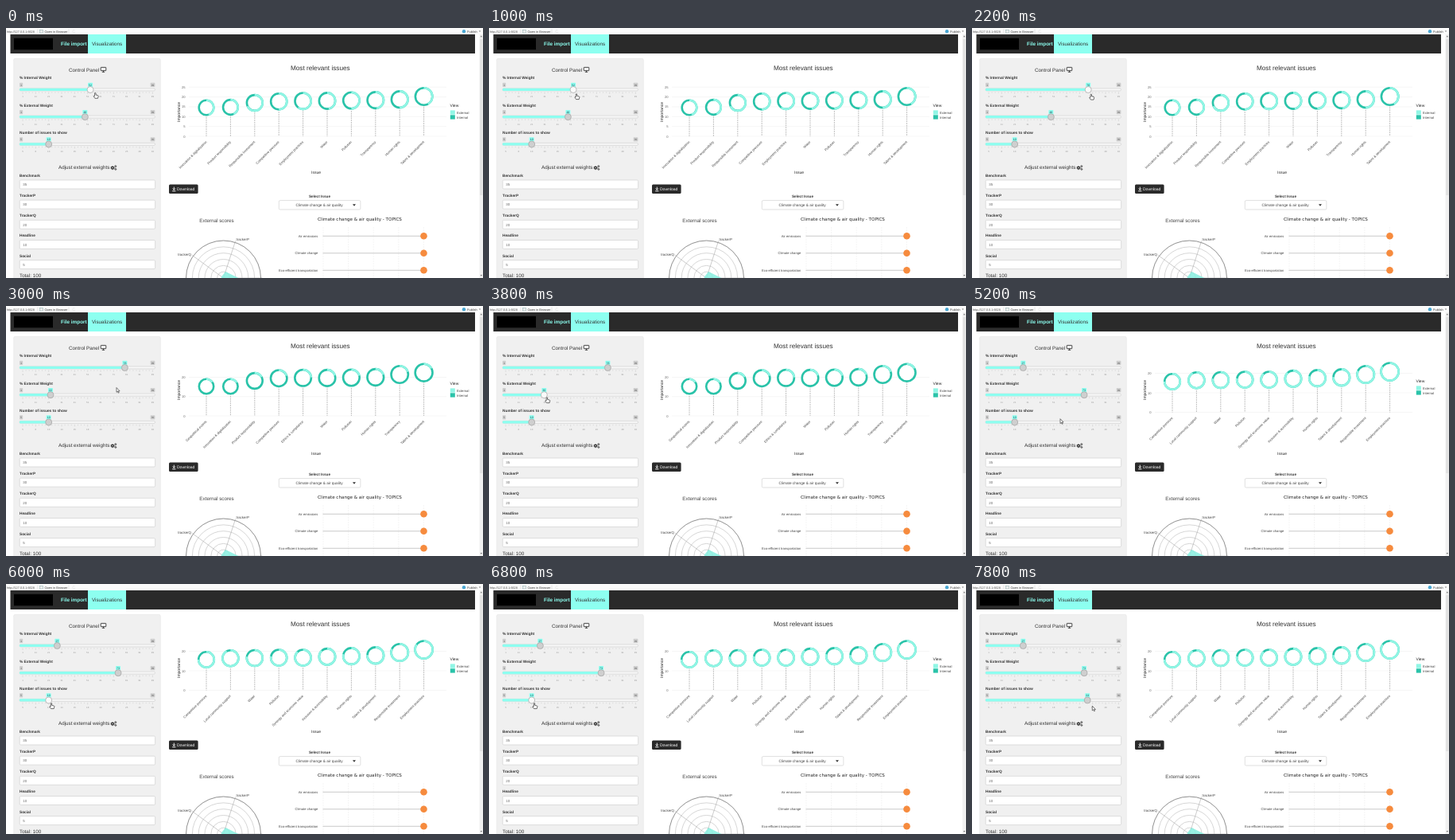
Animation of 600x314 px, one loop 8 s. Source, as an HTML page:

```html
<!DOCTYPE html>
<html lang="en">
<head>
<meta charset="utf-8">
<title>Most relevant issues</title>
<style>
html, body { margin: 0; width: 100%; height: 100%; overflow: hidden; background: #fff; }
svg { display: block; width: 100vw; height: 100vh; }
text { font-family: "Liberation Sans", Arial, sans-serif; text-rendering: geometricPrecision; white-space: pre; }
</style>
</head>
<body>
<svg id="stage" viewBox="0 0 600 314"></svg>
<script>
const MINT = '#8dfff0', GREEN = '#2ac3a9', RING_MINT = '#90f6e5', DARK = '#2a2a2a';
const LOOP = 8000, STEP = 200;
const stage = document.getElementById('stage');

function el(parent, tag, attrs, content) {
  const node = document.createElementNS('http://www.w3.org/2000/svg', tag);
  set(node, attrs);
  if (content !== undefined) node.textContent = content;
  parent.append(node);
  return node;
}
function set(node, attrs) {
  for (const key in attrs) node.setAttribute(key, attrs[key]);
}
const group = (parent = stage, attrs = {}) => el(parent, 'g', attrs);
const rect = (g, x, y, width, height, fill, more = {}) =>
  el(g, 'rect', { x, y, width, height, fill, ...more });
const circle = (g, cx, cy, r, fill, more = {}) => el(g, 'circle', { cx, cy, r, fill, ...more });
const path = (g, d, stroke, width = 0.5, more = {}) =>
  el(g, 'path', { d, stroke, 'stroke-width': width, fill: 'none', ...more });
const shape = (g, d, fill, more = {}) => el(g, 'path', { d, fill, ...more });
const text = (g, x, y, size, content, fill = '#333', more = {}) =>
  el(g, 'text', { x, y, 'font-size': size, fill, ...more }, content);
const MID = { 'text-anchor': 'middle' }, END = { 'text-anchor': 'end' }, BOLD = { 'font-weight': 'bold' };

function drawFrame() {
  const g = group();
  rect(g, 0, 0, 600, 8, '#fbfbfb');
  text(g, 1, 5.8, 3.8, 'http://127.0.0.1:6628', '#555');
  path(g, 'M40 1.5V6.5M79 1.5V6.5', '#ccc');
  rect(g, 42.5, 2.5, 4, 3.6, '#eee', { stroke: '#8aa', 'stroke-width': 0.5 });
  text(g, 48.6, 5.8, 3.9, 'Open in Browser', '#444');
  path(g, 'M86.5 3A1.7 1.7 0 1 0 87 5', '#ddd', 0.6);
  circle(g, 576, 4.2, 2.2, '#49a6d2');
  text(g, 580, 5.8, 3.9, 'Publish', '#444');
  shape(g, 'M594.8 3.5h2.4l-1.2 1.6z', '#777');
  rect(g, 5.5, 8, 584.5, 24, DARK);
  rect(g, 10, 12.8, 49, 14.4, '#000');
  rect(g, 103, 8, 48, 24, MINT);
  text(g, 69, 22.2, 6.4, 'File import', MINT, BOLD);
  text(g, 108, 22.2, 6.25, 'Visualizations', '#333');
  rect(g, 595.5, 8, 4.5, 306, '#f1f1f1');
  rect(g, 596, 14, 3.5, 196, '#e2e2e2');
  shape(g, 'M596.5 11.2h2.6l-1.3-1.8zM596.5 310h2.6l-1.3 1.8z', '#777');
}

function gear(g, cx, cy, r) {
  circle(g, cx, cy, r * 0.65, 'none', { stroke: '#222', 'stroke-width': r * 0.55 });
  circle(g, cx, cy, r, 'none', {
    stroke: '#222', 'stroke-width': r * 0.4, 'stroke-dasharray': `${r * 0.42} ${r * 0.365}`
  });
}

function drawPanel() {
  const g = group();
  rect(g, 9.7, 38.3, 184.6, 290, '#f0f0f0', { rx: 2, stroke: '#e0e0e0', 'stroke-width': 0.5 });
  text(g, 79, 54.6, 6.3, 'Control Panel');
  rect(g, 119.2, 49.4, 6.6, 4.2, 'none', { rx: 0.5, stroke: '#222', 'stroke-width': 0.8 });
  path(g, 'M122.5 53.7V55.2M120.8 55.3H124.2', '#222', 0.8);
  text(g, 66, 177.4, 6.25, 'Adjust external weights');
  gear(g, 134, 175.6, 2.1);
  gear(g, 137.8, 173.7, 1.2);
  gear(g, 137.8, 177.4, 1.2);
  const inputs = [['Benchmark', 35], ['TrackerP', 30], ['TrackerQ', 20], ['Headline', 10], ['Social', 5]];
  inputs.forEach(([name, value], i) => {
    const y = 191 + i * 25.15;
    text(g, 17, y - 4, 4.75, name, '#333', BOLD);
    rect(g, 17.2, y, 170.4, 11, '#fff', { rx: 1.4, stroke: '#ccc', 'stroke-width': 0.6 });
    text(g, 21.3, y + 7.2, 4.4, value, '#666');
  });
  text(g, 17, 313.2, 6.25, 'Total: 100');
}

function makeSlider(label, y, min, max, unit) {
  const g = group();
  const xOf = v => 21 + (v - min) / (max - min) * 163.4;
  text(g, 17, y - 13, 4.8, label, '#333', BOLD);
  const badge = (x, w, fill, value) => {
    rect(g, x, y - 8.5, w, 5.2, fill, { rx: 0.8 });
    return text(g, x + w / 2, y - 4.7, 3.2, value, '#555', MID);
  };
  badge(17, 4.2, '#cfcfcf', min);
  badge(181.6, 5.8, '#cfcfcf', max);
  rect(g, 17, y - 1.4, 170.5, 3, '#f7f7f7', { rx: 1.4, stroke: '#c4c4c4', 'stroke-width': 0.5 });
  const fill = rect(g, 17, y - 1.5, 1, 3.2, MINT, { rx: 1.2 });
  for (let i = 0; i <= 40; i++) {
    const x = 21 + i * 4.085, major = i % 4 === 0;
    path(g, `M${x} ${y + 3}v${major ? 2.6 : 1.4}`, '#bbb', 0.4);
    if (major) text(g, x, y + 10, 2.9, Math.min(max, Math.round(min + i / 4 * unit)), '#999', MID);
  }
  const tag = group(g);
  rect(tag, -3, y - 8.5, 6, 5.2, MINT, { rx: 0.8 });
  const number = text(tag, 0, y - 4.6, 3.5, '', '#245', MID);
  const knob = circle(g, 0, y + 0.2, 4, '#cfcfcf', { stroke: '#a3a3a3', 'stroke-width': 0.7 });
  return (value, active) => {
    const x = xOf(value);
    set(fill, { width: x - 17 });
    set(tag, { transform: `translate(${x})` });
    set(knob, { cx: x, fill: active ? '#fafafa' : '#cfcfcf' });
    number.textContent = Math.round(value);
  };
}

// Each ring: name, centre height, external share.
const charts = [
  { zero: 136, unit: 12.35 / 5, ticks: [0, 5, 10, 15, 20, 25], legend: 0, axis: 183, rings: [
    ['Innovation & digitalization', 100, .45], ['Product responsibility', 99.5, .43],
    ['Responsible Investment', 94, .68], ['Competitive pressure', 92.3, .5],
    ['Employment practices', 91.7, .6], ['Water', 91.5, .47], ['Pollution', 91, .5],
    ['Transparency', 90.6, .48], ['Human rights', 89.7, .5], ['Talent & development', 86, .42]] },
  { zero: 138, unit: 2.42, ticks: [0, 10, 20], legend: 0, axis: 186.7, rings: [
    ['Geopolitical events', 101, .15], ['Innovation & digitalization', 101, .16],
    ['Product responsibility', 94, .17], ['Competitive pressure', 90.7, .2],
    ['Ethics & compliance', 90.3, .24], ['Water', 90.4, .2], ['Pollution', 90, .21],
    ['Human rights', 89.5, .2], ['Transparency', 86, .2], ['Talent & development', 83.7, .17]] },
  { zero: 133.5, unit: 2.45, ticks: [0, 10, 20], legend: -3, axis: 186.7, rings: [
    ['Competitive pressure', 95, .75], ['Local community support', 93.2, .92],
    ['Water', 93, .78], ['Pollution', 92.6, .78], ['Synergy and economic value', 92.6, .88],
    ['Inclusion & accessibility', 91.3, .88], ['Human rights', 90.6, .79],
    ['Talent & development', 89.7, .76], ['Responsible Investment', 86, .82],
    ['Employment practices', 82.5, .85]] }
].map(drawChart);

function drawChart({ zero, unit, ticks, legend, axis, rings }) {
  const g = group();
  for (const value of ticks) {
    const y = zero - value * unit;
    path(g, `M230 ${y}H554`, '#ececec', 0.5);
    text(g, 225.5, y + 1.5, 4.1, value, '#666', END);
  }
  rings.forEach(([name, y, external], i) => {
    const x = 252 + i * 30.4, r = 9.2 + (101 - y) * 0.1;
    path(g, `M${x} ${y + r}V${zero}`, '#777', 0.5, { 'stroke-dasharray': '1.8 1' });
    circle(g, x, y, r + 1.2, '#fff');
    circle(g, x, y, r, 'none', { stroke: GREEN, 'stroke-width': 2.6 });
    circle(g, x, y, r, 'none', {
      stroke: RING_MINT, 'stroke-width': 2.6, pathLength: 1,
      'stroke-dasharray': `${external} 1`, transform: `rotate(-90 ${x} ${y})`
    });
    text(g, 0, 0, 4.2, name, '#444', {
      ...END, transform: `translate(${x + 0.8} ${zero + 7.5}) rotate(-45)`
    });
  });
  text(g, 390, axis, 5, 'Issue', '#222', MID);
  const key = group(g, { transform: `translate(0 ${legend})` });
  text(key, 558.5, 99.3, 5, 'View', '#222');
  [['External', RING_MINT], ['Internal', GREEN]].forEach(([name, color], i) => {
    rect(key, 558.8, 103.4 + i * 5.9, 6, 5.3, color);
    text(key, 567, 107.6 + i * 5.9, 4.2, name, '#444');
  });
  return g;
}

function drawMain() {
  const g = group();
  text(g, 395.3, 53, 8.2, 'Most relevant issues', '#333', MID);
  text(g, 0, 0, 5, 'Importance', '#222', { ...MID, transform: 'translate(219 105.5) rotate(-90)' });
  rect(g, 205, 196.5, 36.6, 11.4, DARK, { rx: 1.5 });
  path(g, 'M211.3 199.6V203M209.6 201.6L211.3 203.3L213 201.6M209.2 204.8H213.4', '#fff', 0.9);
  text(g, 215, 204, 5, 'Download', '#fff');
  text(g, 394.5, 213.4, 4.7, 'Select Issue', '#333', { ...MID, ...BOLD });
  rect(g, 343.3, 216.6, 102.6, 11.4, '#fff', { rx: 1.4, stroke: '#ccc', 'stroke-width': 0.6 });
  text(g, 394, 223.9, 4.75, 'Climate change & air quality', '#444', MID);
  shape(g, 'M436 221.3h4l-2 2.4z', '#333');
}

function drawRadar() {
  const g = group(), cx = 273.5, cy = 314, R = 47;
  const at = (degrees, r) => {
    const a = degrees * Math.PI / 180;
    return `${cx + r * Math.cos(a)} ${cy - r * Math.sin(a)}`;
  };
  text(g, 265, 243.8, 6.3, 'External scores', '#444', MID);
  for (let i = 1; i <= 6; i++)
    circle(g, cx, cy, R * i / 6, 'none', { stroke: i === 6 ? '#444' : '#bbb', 'stroke-width': 0.6 });
  for (let i = 0; i < 5; i++) path(g, `M${cx} ${cy}L${at(i * 72, R + 2)}`, '#999', 0.5);
  shape(g, `M${at(0, 19)}L${at(72, 8.5)}L${at(144, 3)}L${at(216, 4)}Z`, '#86eedf', { opacity: 0.85 });
  text(g, 289.5, 267.2, 4.4, 'trackerP', '#444');
  text(g, 233, 286.3, 4.4, 'trackerQ', '#444', END);
}

function drawTopics() {
  const g = group();
  text(g, 445, 241.5, 5.6, 'Climate change & air quality - TOPICS', '#222',
    { ...MID, style: 'font-family:"DejaVu Sans",sans-serif' });
  for (let i = 0; i < 5; i++)
    path(g, `M${399 + i * 31.6} 250V314`, '#e8e8e8', 0.5, { 'stroke-dasharray': '2 1' });
  ['Air emissions', 'Climate change', 'Eco-efficient transportation'].forEach((name, i) => {
    const y = 261.3 + i * 21.5;
    text(g, 392.3, y + 1.4, 4.15, name, '#444', END);
    path(g, `M398.5 ${y}H525`, '#c4c4c4', 0.9);
    circle(g, 525.5, y, 4.3, '#f68b3e');
  });
}

drawFrame();
drawPanel();
const sliders = [
  makeSlider('% Internal Weight', 77.3, 1, 99, 10),
  makeSlider('% External Weight', 111.5, 1, 99, 10),
  makeSlider('Number of issues to show', 145.8, 5, 30, 2.5)
];
drawMain();
drawRadar();
drawTopics();

const arrow = group(), hand = group();
shape(arrow, 'M0 0V5.8L1.4 4.6L2.3 6.6L3.2 6.2L2.3 4.3H4.1Z', '#fff', { stroke: '#222', 'stroke-width': 0.6 });
shape(hand, 'M-.7 0Q0-.7.7 0V2.3L3.4 3Q4 3.3 3.8 4.2L3.2 6.6H-.4L-2.2 4Q-2 3-.7 3.8Z', '#fff',
  { stroke: '#222', 'stroke-width': 0.65 });

// Rows are [time, ...values]; values ease from row to row.
function track(rows, t) {
  const i = Math.max(0, rows.findLastIndex(row => row[0] <= t));
  const a = rows[i], b = rows[i + 1] || a;
  const p = b === a ? 0 : (t - a[0]) / (b[0] - a[0]);
  const eased = p * p * (3 - 2 * p);
  return a.slice(1).map((v, k) => v + (b[k + 1] - v) * eased);
}

const pointer = [
  [0, 112.3, 81.7], [200, 112.3, 81.7], [1000, 110, 83], [1200, 110, 83], [2400, 153, 83.5], [2600, 153, 83.5],
  [3000, 139, 102.5], [3400, 59.5, 114], [3600, 59.5, 115], [4400, 145, 115.5], [4600, 145, 115.5],
  [5200, 111, 141.7], [5800, 57, 150], [6800, 57, 150], [7600, 149, 151], [7800, 151.3, 153.2]
];
const values = [
  [[0, 52], [1200, 52], [2400, 78], [4799, 78], [4800, 27]],
  [[0, 48], [2599, 48], [2600, 22], [3600, 22], [4400, 73]],
  [[0, 10], [6800, 10], [7600, 24]]
];
const grabs = [[0, 2600], [3400, 4800], [5800, 7800]];
const show = (node, visible) => { node.style.display = visible ? '' : 'none'; };

function render(t) {
  const held = grabs.findIndex(([from, to]) => t >= from && t < to);
  sliders.forEach((update, i) => update(track(values[i], t)[0], i === held));
  const current = t < 2800 ? 0 : t < 5000 ? 1 : 2;
  charts.forEach((chart, i) => show(chart, i === current));
  const [x, y] = track(pointer, t);
  for (const node of [arrow, hand]) set(node, { transform: `translate(${x} ${y})` });
  show(hand, held >= 0);
  show(arrow, held < 0);
}

const start = performance.now();
function tick() {
  const t = (performance.now() - start) % LOOP;
  render(Math.floor(t / STEP) * STEP);
  requestAnimationFrame(tick);
}
render(0);
requestAnimationFrame(tick);
</script>
</body>
</html>
```
